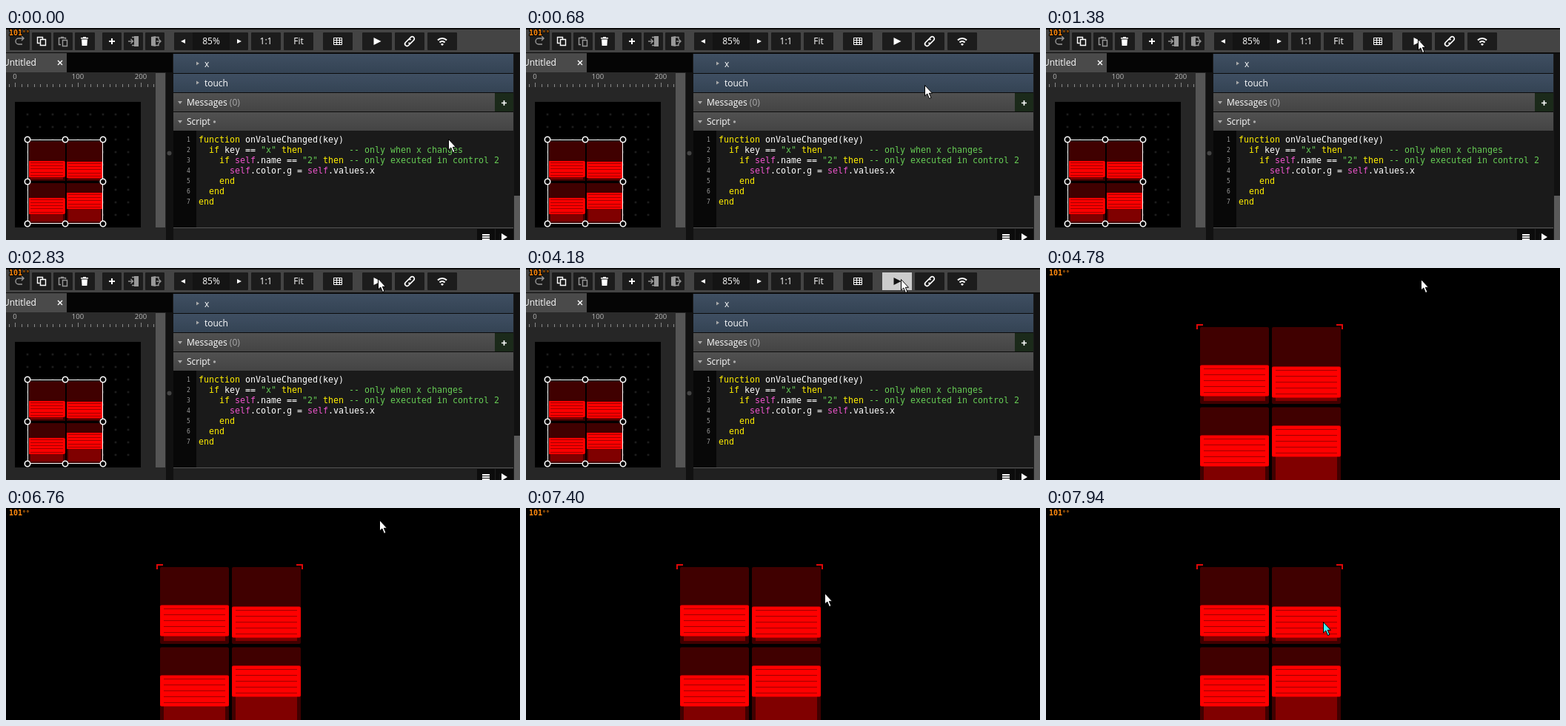
An HTML page for the animation above (8000 ms loop, 694 by 287 pixels).

```html
<!DOCTYPE html>
<html lang="en">
<head>
<meta charset="utf-8">
<title>Script editor</title>
<style>
html, body { margin: 0; width: 100%; height: 100%; overflow: hidden; background: #000; }
svg { display: block; font: 12px "Open Sans", "Noto Sans", sans-serif; fill: #fff; }
.code { font: 11.63px "DejaVu Sans Mono", monospace; white-space: pre; }
.num { font: 8px "DejaVu Sans Mono", monospace; fill: #999; }
.k { fill: #ffee00; }
.s { fill: #ee55cc; }
.g { fill: #66cc55; }
.ruler { font-size: 9.5px; fill: #bbb; text-anchor: middle; }
.line { fill: none; stroke: #fff; stroke-width: 1.4; }
.off { stroke: #999; }
</style>
</head>
<body>
<svg width="694" height="287" viewBox="0 0 694 287">
  <defs>
    <linearGradient id="head" x2="0" y2="1"><stop stop-color="#515151"/><stop offset="1" stop-color="#444"/></linearGradient>
    <linearGradient id="blue" x2="0" y2="1"><stop stop-color="#3f4f62"/><stop offset="1" stop-color="#344354"/></linearGradient>
    <pattern id="dots" x="20.5" y="108.5" width="17" height="17" patternUnits="userSpaceOnUse">
      <rect x="7.5" y="7.5" width="2" height="2" fill="#333"/>
    </pattern>
    <g id="faders"></g>
  </defs>

  <g id="editor">
    <rect width="694" height="287" fill="#1a1a1a"/>
    <rect width="694" height="33" fill="#444"/>
    <path d="M0 0H694V2H0ZM0 33H694V35H0Z" fill="#0c0c0c"/>
    <g id="buttons" fill="#1c1c1c"></g>

    <!-- toolbar icons -->
    <g class="line">
      <path class="off" d="M22 22H17a4 4 0 0 1 0-8H24M21 11l3 3l-3 3"/>
      <path d="M45.500 20.500H42.500V12.500H49.500V15M46.500 15.500H53.500V23.500H46.500Z"/>
      <path class="off" d="M74 22.500H71.500V13.500H80.500V15M74 12.500H78M76.500 16.500H82.500V24.500H76.500Z"/>
      <path class="off" d="M170 12.500H173M170 23.500H173M165 18H171M168.500 15l3 3l-3 3M202 12.500H206V15M202 23.500H206V21M203 18H208M206 15l3 3l-3 3"/>
      <path d="M139 18H147M143 14V22" stroke-width="2"/>
      <path d="M442.500 13.500H453.500V22.500H442.500ZM442 16.500H454M442 19.500H454M446.500 13V23M450.500 13V23" stroke-width="1"/>
      <path d="M544 15l2.500-2.500a2.600 2.600 0 0 1 4 4L547 20a2.600 2.600 0 0 1-3.500 0M546 21l-2.500 2.500a2.600 2.600 0 0 1-4-4L543 16a2.600 2.600 0 0 1 3.500 0" stroke-width="1.700"/>
      <path d="M583 16.500a8.500 8.500 0 0 1 12 0M585.500 19.500a5 5 0 0 1 7 0" stroke-width="2.200"/>
    </g>
    <path d="M173 11h6v14h-6ZM196 12l6-1v14l-6-1Z" fill="#999"/>
    <path d="M101 13h3v-1h4v1h3v1.500h-10ZM102 15.500h8l-.6 8.500h-6.800ZM587 22a2.800 2.800 0 0 1 4 0l-2 2ZM242 15v6l-6-3ZM312 15v6l6-3Z"/>
    <rect id="hot" x="481" y="6" width="40" height="24" fill="#ccc"/>
    <path id="play" d="M496.500 13V23L506.500 18Z"/>
    <g text-anchor="middle"><text x="277" y="22">85%</text><text x="351" y="22">1:1</text><text x="395" y="22">Fit</text></g>

    <!-- document pane -->
    <rect y="34" width="225" height="26" fill="#050505"/>
    <rect y="34" width="82" height="26" fill="#4a4a4a"/>
    <text x="-4" y="51">Untitled</text>
    <path class="line" d="M70 44l6 6M76 44l-6 6" stroke-width="1.800"/>
    <rect y="60" width="216" height="227" fill="#262626"/>
    <rect y="60" width="202" height="20" fill="#2b2b2b"/>
    <g class="ruler"><text x="12" y="69">0</text><text x="97" y="69">100</text><text x="182" y="69">200</text></g>
    <path id="ticks" stroke="#888"/>
    <rect x="202" y="61" width="13" height="209" fill="#555"/>
    <rect x="216" y="60" width="10" height="227" fill="#111"/>
    <circle cx="220.500" cy="169.500" r="3" fill="#444"/>
    <rect x="12" y="100" width="170" height="170" fill="#000"/>
    <rect x="21" y="109" width="153" height="153" fill="url(#dots)"/>
    <rect x="29" y="151" width="102" height="114" fill="#000"/>
    <use href="#faders" transform="translate(30.700 152.700) scale(.5257)" shape-rendering="crispEdges"/>
    <rect x="29.500" y="151.500" width="101" height="113" fill="none" stroke="#fff"/>
    <g id="handles" fill="#000" stroke="#fff" stroke-width="1.600"></g>

    <!-- inspector -->
    <rect x="226" y="35" width="459" height="26" fill="url(#blue)"/>
    <rect x="226" y="62" width="459" height="25" fill="url(#blue)"/>
    <rect x="226" y="88" width="459" height="25" fill="url(#head)"/>
    <rect x="226" y="114" width="459" height="25" fill="url(#head)"/>
    <path d="M226 61.500H685M226 87.500H685M226 113.500H685" stroke="#0c0c0c"/>
    <rect x="660" y="88" width="25" height="25" fill="#1b2a1a"/>
    <path d="M669 101.500H676M672.500 98V105" stroke="#fff" stroke-width="1.600"/>
    <path d="M257 45.500v5l4-2.500ZM257 71.500v5l4-2.500ZM232 99h6l-3 4ZM232 125h6l-3 4Z" fill="#aaa"/>
    <text x="268" y="53">x</text>
    <text x="268" y="79">touch</text>
    <text x="244" y="105">Messages <tspan fill="#aaa">(0)</tspan></text>
    <text x="244" y="131">Script</text>
    <circle cx="281.500" cy="127" r="1.700" fill="#aaa"/>
    <rect x="226" y="139" width="31" height="131" fill="#080808"/>
    <g id="code"></g>
    <path d="M226 270.500H685" stroke="#555"/>
    <rect x="226" y="271" width="459" height="16" fill="#202020"/>
    <path d="M636 272h24v15h-24ZM661 272h24v15h-24Z" fill="#0c0c0c"/>
    <path d="M643 280h10M643 283h10M643 286h10" stroke="#fff" stroke-width="2"/>
    <path d="M669 278v10l8-5Z"/>
    <rect x="686" y="35" width="8" height="252" fill="#111"/>
    <rect x="686" y="227" width="8" height="60" fill="#5a5a5a"/>
  </g>

  <g id="run">
    <rect width="694" height="287" fill="#000"/>
    <use href="#faders" x="208" y="80"/>
    <path d="M204 83V77H212M392 77H400V83" fill="none" stroke="#e00808" stroke-width="2"/>
  </g>

  <text x="4" y="10" fill="#ff8a10" stroke="#000" stroke-width="2" paint-order="stroke"
    style="font:bold 10px 'DejaVu Sans Mono',monospace">101<tspan font-size="8">°°</tspan></text>
  <path id="cursor" d="M.5 .5V15L3.800 12L6.500 18.500L9 17.500L6.300 11.300H10.500Z" stroke="#000"/>
</svg>
<script>
const $ = id => document.getElementById(id);
const rect = (x, y, w, h, more = '') => `<rect x="${x}" y="${y}" width="${w}" height="${h}" ${more}/>`;

$('buttons').innerHTML = [[5, 27], [35, 26], [64, 26], [93, 27], [130, 26], [159, 26], [188, 26], [227, 100],
  [331, 40], [375, 40], [428, 40], [481, 40], [525, 40], [569, 40]].map(([x, w]) => rect(x, 6, w, 24, 'rx="1"')).join('')
  + rect(252, 6, 50, 24, 'fill="#141414"');

let ticks = '';
for (let i = -1; i < 23; i++) ticks += `M${Math.round(12 + i * 8.5) + .5} 80v${i % 10 ? -4 : -6}`;
$('ticks').setAttribute('d', ticks);

// One fader: a dark track, the fill below the knob, and the grooved knob
function fader(x, y, knob) {
  let grooves = '';
  for (let i = 0; i < 5; i++) grooves += `M${x + 5} ${y + knob + 5 + i * 8}h83`;
  return rect(x, y, 93, 104, 'rx="2" fill="#400000"')
    + rect(x + 5, y + knob + 40, 83, 60 - knob, 'fill="#800000"')
    + rect(x, y + knob, 93, 42, 'rx="2" fill="#f00"')
    + `<path d="${grooves}" stroke="#a00000" vector-effect="non-scaling-stroke"/>`;
}
$('faders').innerHTML = fader(0, 0, 51.5) + fader(97, 0, 53.5) + fader(0, 108.5, 38) + fader(97, 108.5, 25);

for (const x of [29, 80, 131]) for (const y of [151, 208, 265])
  if (x !== 80 || y !== 208) $('handles').innerHTML += `<circle cx="${x}" cy="${y}" r="3.7"/>`;

const script = `function onValueChanged(key)
  if key == "x" then         -- only when x changes
    if self.name == "2" then -- only executed in control 2
      self.color.g = self.values.x
    end
  end
end`;
const paint = line => line.replace(/--.*|"\w"|\b(?:function|if|then|end)\b|\bself\b/g, w =>
  `<tspan class="${w === 'self' ? 's' : /^\w/.test(w) ? 'k' : 'g'}">${w}</tspan>`);
$('code').innerHTML = script.split('\n').map((line, i) =>
  `<text class="num" x="244" y="${154 + i * 14}">${i + 1}</text>
   <text class="code" x="260" y="${155 + i * 14}">${paint(line)}</text>`).join('');

// Pointer tip: time, x, y
const path = [[0, 597, 150], [120, 597, 150], [400, 568, 117], [680, 538, 77], [940, 517, 43], [1120, 508, 26],
  [1380, 502, 15], [2800, 502, 15], [2830, 502, 14], [3100, 502, 14], [3260, 506, 15], [6730, 506, 15],
  [6760, 504, 16], [7120, 449, 68], [7470, 392, 127], [7540, 392, 127], [7940, 374, 154], [8000, 374, 154]];

function tip(t) {
  const i = path.findIndex(p => p[0] > t), a = path[i - 1], b = path[i];
  const f = (t - a[0]) / (b[0] - a[0]);
  return [1, 2].map(k => Math.round(a[k] + (b[k] - a[k]) * f));
}

function draw(now) {
  const t = now % 8000, running = t >= 4780, pressed = t >= 4180;
  $('editor').style.display = running ? 'none' : '';
  $('run').style.display = running ? '' : 'none';
  $('hot').style.display = pressed ? '' : 'none';
  $('play').style.fill = pressed ? '#111' : '#fff';
  $('cursor').setAttribute('transform', `translate(${tip(t)})`);
  $('cursor').style.fill = t >= 7570 ? '#40f0f0' : '#fff';
}
const start = performance.now();
function loop() {
  draw(performance.now() - start);
  requestAnimationFrame(loop);
}
loop();
</script>
</body>
</html>
```
